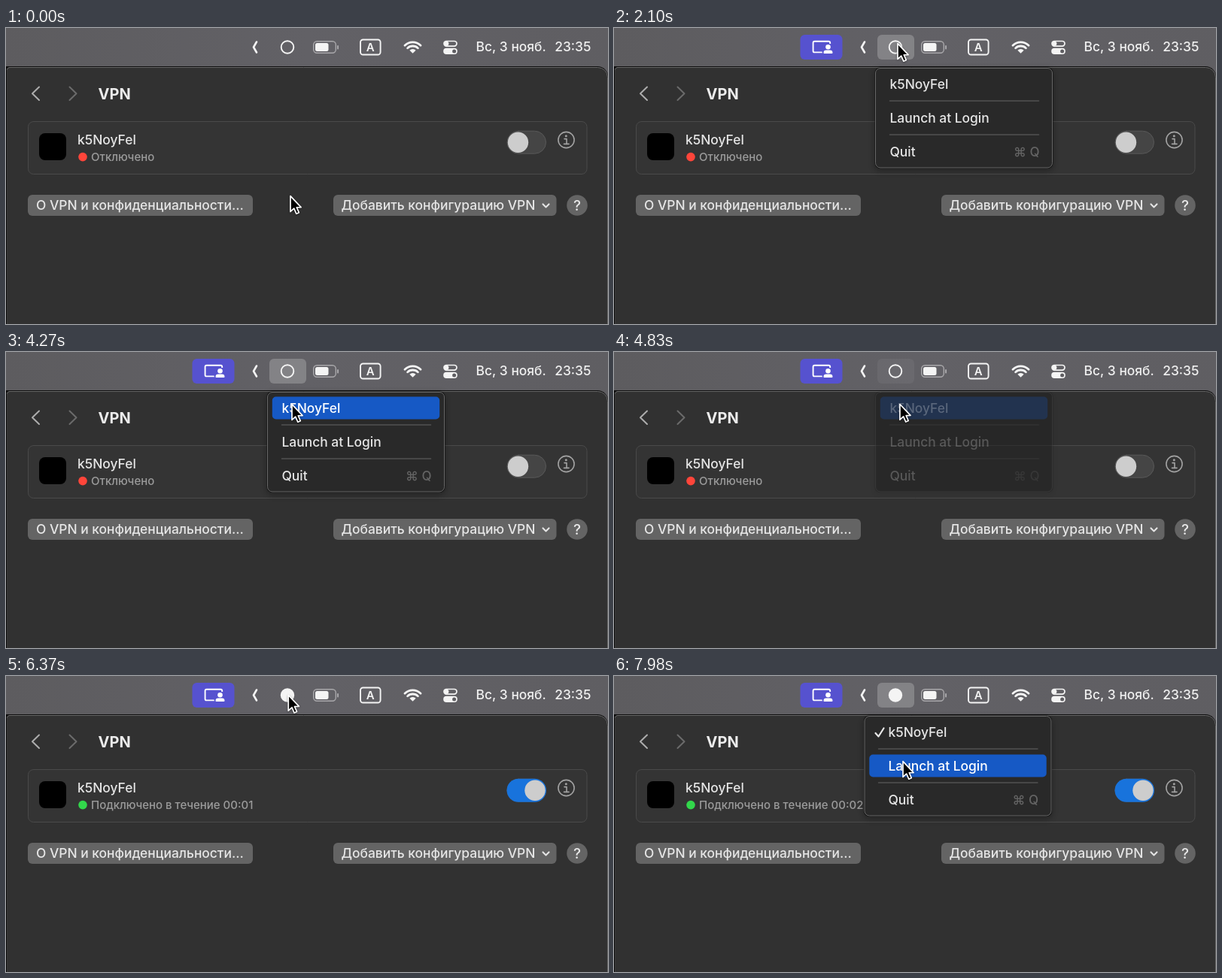
An HTML page with a canvas for the animation above (8000 ms loop, 800 by 394 pixels).

```html
<!DOCTYPE html>
<html lang="ru">
<head>
<meta charset="utf-8">
<title>VPN</title>
<style>
  html, body { margin: 0; width: 100%; height: 100%; overflow: hidden; background: #313131; }
  canvas { display: block; width: 800px; height: 394px; }
</style>
</head>
<body>
<canvas id="stage"></canvas>
<script>
const W = 800, H = 394, LOOP = 8000, STEP = 70;
const APP = 'k5NoyFel';
const FONT = 'Inter, "Noto Sans", sans-serif';
const canvas = document.getElementById('stage');
const ctx = canvas.getContext('2d');
const dpr = window.devicePixelRatio || 1;
canvas.width = W * dpr;
canvas.height = H * dpr;

// time, x, y of the pointer tip
const path = [
  [0, 377, 223], [1000, 377, 223], [1820, 376, 20], [3290, 376, 20],
  [4130, 379, 69], [4620, 379, 69], [5390, 378, 67], [5950, 378, 67],
  [6510, 374, 22], [6930, 374, 22], [7490, 383, 113], [LOOP, 383, 113]
];
const T = { share: 70, open: 2100, pick: 4620, slide: 5110, connect: 5250, reopen: 6650 };

const clamp = v => Math.max(0, Math.min(1, v));
const ramp = (t, start, length) => clamp((t - start) / length);
const ease = p => p < 0.5 ? 4 * p ** 3 : 1 - (2 - 2 * p) ** 3 / 2;

function pointerAt(t) {
  const i = path.findIndex((k, n) => n > 0 && t <= k[0]);
  const [t0, x0, y0] = path[i - 1], [t1, x1, y1] = path[i];
  const p = ease((t - t0) / (t1 - t0));
  return { x: x0 + (x1 - x0) * p, y: y0 + (y1 - y0) * p };
}

function paint(fill, stroke, width = 1) {
  if (fill) { ctx.fillStyle = fill; ctx.fill(); }
  if (stroke) { ctx.strokeStyle = stroke; ctx.lineWidth = width; ctx.stroke(); }
}
function box(x, y, w, h, r, fill, stroke, width) {
  ctx.beginPath();
  ctx.roundRect(x, y, w, h, r);
  paint(fill, stroke, width);
}
function disc(x, y, r, fill, stroke, width) {
  ctx.beginPath();
  ctx.arc(x, y, r, 0, Math.PI * 2);
  paint(fill, stroke, width);
}
function line(points, color, width) {
  ctx.beginPath();
  points.forEach(([x, y]) => ctx.lineTo(x, y));
  paint(null, color, width);
}
function text(s, x, y, color = '#e6e6e6', size = 17.4, weight = 500, align = 'left') {
  ctx.font = `${weight} ${size}px ${FONT}`;
  ctx.textAlign = align;
  ctx.fillStyle = color;
  ctx.fillText(s, x, y);
}

function drawWindow() {
  const bar = ctx.createLinearGradient(0, 0, W, 0);
  bar.addColorStop(0, '#5d5c5f');
  bar.addColorStop(0.5, '#626166');
  bar.addColorStop(1, '#5f5e62');
  ctx.fillStyle = bar;
  ctx.fillRect(0, 0, W, H);
  box(0, 51, 800, 380, [0, 14, 0, 0], '#0b0b0b');
  box(1.5, 52.5, 798, 380, [3, 13, 0, 0], '#313131', '#686868', 1);
  ctx.fillStyle = '#0b0b0b';
  ctx.fillRect(0, 56, 1.5, H);
}

function drawWifi() {
  const cx = 540.5, cy = 33.8, a = Math.PI * 0.25;
  [14.9, 9.8].forEach(r => {
    ctx.beginPath();
    ctx.arc(cx, cy, r, -Math.PI / 2 - a, -Math.PI / 2 + a);
    paint(null, '#f4f4f4', 2.8);
  });
  ctx.beginPath();
  ctx.moveTo(cx, cy);
  ctx.arc(cx, cy, 5.8, -Math.PI / 2 - a, -Math.PI / 2 + a);
  ctx.closePath();
  paint('#f4f4f4');
}

function drawShare(alpha) {
  ctx.globalAlpha = alpha;
  box(247.5, 9, 56, 33, 6, '#5652cf');
  box(264.6, 17.8, 22.6, 14.6, 2, null, '#fff', 1.9);
  box(276.5, 21, 15, 14, 4, '#5652cf');
  disc(284.5, 25.2, 3.3, '#fff');
  box(278.5, 29.6, 12, 4.3, [4, 4, 1, 1], '#fff');
  ctx.globalAlpha = 1;
}

function drawBar(t, menuAlpha, on) {
  const white = '#f4f4f4';
  if (t >= T.share) drawShare(ramp(t, 0, 210));
  line([[333, 18.5], [329, 25.5], [333, 32.5]], white, 2.6);
  if (menuAlpha) box(350, 9, 49, 33, 6, `rgba(255,255,255,${0.21 * menuAlpha})`);
  if (on) disc(374, 25.5, 9.2, white);
  else disc(374, 25.5, 8.3, null, white, 1.9);
  box(408.7, 17.7, 29.6, 15.6, 4.5, null, '#a9a8ab', 1.4);
  box(411, 20, 17.5, 11, 2.5, white);
  box(440, 23, 2, 5.5, 1, '#a9a8ab');
  box(471, 15.5, 26.6, 20, 3.5, null, white, 1.9);
  text('A', 484.3, 30.9, white, 15, 600, 'center');
  drawWifi();
  box(582, 17.5, 17, 6.6, 3.3, null, white, 1.7);
  disc(585.4, 20.8, 3, white);
  box(581.2, 26.8, 18.6, 8.2, 4.1, white);
  disc(595.6, 30.9, 2.5, '#5f5e62');
  text('Вс, 3 нояб.', 624.5, 31.3, '#f0f0f0');
  text('23:35', 777.5, 31.3, '#f0f0f0', 17.4, 500, 'right');
}

function drawStatus(t, on) {
  const sec = Math.max(0, Math.floor((t - T.connect) / 1000));
  const label = on ? `Подключено в течение 00:0${sec}` : 'Отключено';
  disc(102, 171.6, 5.8, on ? '#32d74b' : '#ff453a');
  text(label, 113, 177, '#9b9b9b', 15);
}

function drawToggle(p) {
  box(666, 137.2, 51.5, 30, 15, '#454545', '#595959', 1);
  ctx.globalAlpha = p;
  box(665.5, 136.7, 52.5, 31, 15.5, '#1873dc');
  ctx.globalAlpha = 1;
  disc(680.5 + 22.5 * p, 152.2, 13.7, '#cdcdcd');
}

function drawPane(t, on) {
  line([[44, 78.5], [35, 87.3], [44, 96]], '#adadad', 2);
  line([[84.5, 78.5], [93.5, 87.3], [84.5, 96]], '#6b6b6b', 2);
  text('VPN', 122.5, 94.8, '#ececec', 20, 700);

  box(29.5, 124.5, 742.5, 70, 7, '#343434', '#4a4a4a', 1);
  box(44, 140, 36, 36, 8, '#000');
  text(APP, 95, 155.2);
  drawStatus(t, on);
  drawToggle(ease(ramp(t, T.slide, 210)));
  disc(744.5, 149, 10.6, null, '#a2a2a2', 1.6);
  disc(744.3, 143.8, 1.5, '#a2a2a2');
  line([[742, 147.6], [745, 147.6], [745, 154.4]], '#a2a2a2', 1.6);
  line([[741.5, 154.4], [748, 154.4]], '#a2a2a2', 1.6);

  box(29, 222, 299, 28, 6, '#646464');
  text('О VPN и конфиденциальности…', 40, 242);
  box(435, 222, 296.5, 28, 6, '#646464');
  text('Добавить конфигурацию VPN', 445.5, 242);
  line([[713.5, 234.4], [717.5, 238.4], [721.5, 234.4]], '#e4e4e4', 2.1);
  disc(759, 236, 13.8, '#646464');
  text('?', 759, 242.6, '#e8e8e8', 19, 500, 'center');
}

function drawMenu(alpha, checked, py) {
  const x = checked ? 332.5 : 347, right = checked ? 581.5 : 583;
  const tx = checked ? 364.5 : 366.5;
  const sepX = checked ? 351.5 : 366.5, sepR = right - 18.5;
  const rows = [APP, 'Launch at Login', 'Quit'];
  ctx.globalAlpha = alpha;
  ctx.shadowColor = 'rgba(0,0,0,0.35)';
  ctx.shadowBlur = 10;
  ctx.shadowOffsetY = 3;
  box(x - 0.5, 52.5, right - x + 1, 134.5, 7, '#101010');
  ctx.shadowColor = 'transparent';
  box(x + 0.5, 53.5, right - x - 1, 132.5, 6.5, '#292929', '#686868', 1);
  [97, 142].forEach(y => line([[sepX, y], [sepR, y]], '#515151', 1.4));
  rows.forEach((label, i) => {
    const top = 59.5 + 45 * i;
    const hot = py >= top && py <= top + 30;
    if (hot) box(x + 6.8, top, right - x - 13.6, 30, 5, '#1659c5');
    text(label, tx, top + 21.8, hot ? '#fff' : '#e6e6e6');
    if (i === 2) text('⌘ Q', right - 17.5, top + 21.8, hot ? '#fff' : '#646464', 17, 500, 'right');
  });
  if (checked) line([[347.5, 76], [351.5, 80.5], [358.5, 69.5]], '#e8e8e8', 2.2);
  ctx.globalAlpha = 1;
}

function drawPointer({ x, y }) {
  const shape = [[0, 0], [0, 22], [5, 17.4], [8.3, 25], [12, 23.4], [8.8, 16], [15, 15.8]];
  ctx.save();
  ctx.translate(x + 1, y + 0.7);
  ctx.scale(0.94, 0.94);
  ctx.beginPath();
  shape.forEach(([px, py]) => ctx.lineTo(px, py));
  ctx.closePath();
  ctx.shadowColor = 'rgba(0,0,0,0.3)';
  ctx.shadowBlur = 3;
  ctx.shadowOffsetY = 1;
  paint('#000', '#fff', 1.8);
  ctx.restore();
}

function draw(t) {
  const on = t >= T.connect;
  const checked = t >= T.reopen;
  const pointer = pointerAt(t);
  let menu = 0;
  if (checked) menu = 1;
  else if (t >= T.open) menu = 1 - ramp(t, T.pick, 280);

  ctx.setTransform(dpr, 0, 0, dpr, 0, 0);
  ctx.lineCap = ctx.lineJoin = 'round';
  drawWindow();
  drawBar(t, menu, on);
  drawPane(t, on);
  if (menu) drawMenu(menu, checked, pointer.y);
  drawPointer(pointer);
}

function tick() {
  const t = performance.now() % LOOP;
  draw(Math.floor(t / STEP) * STEP);
  requestAnimationFrame(tick);
}
tick();
</script>
</body>
</html>
```
